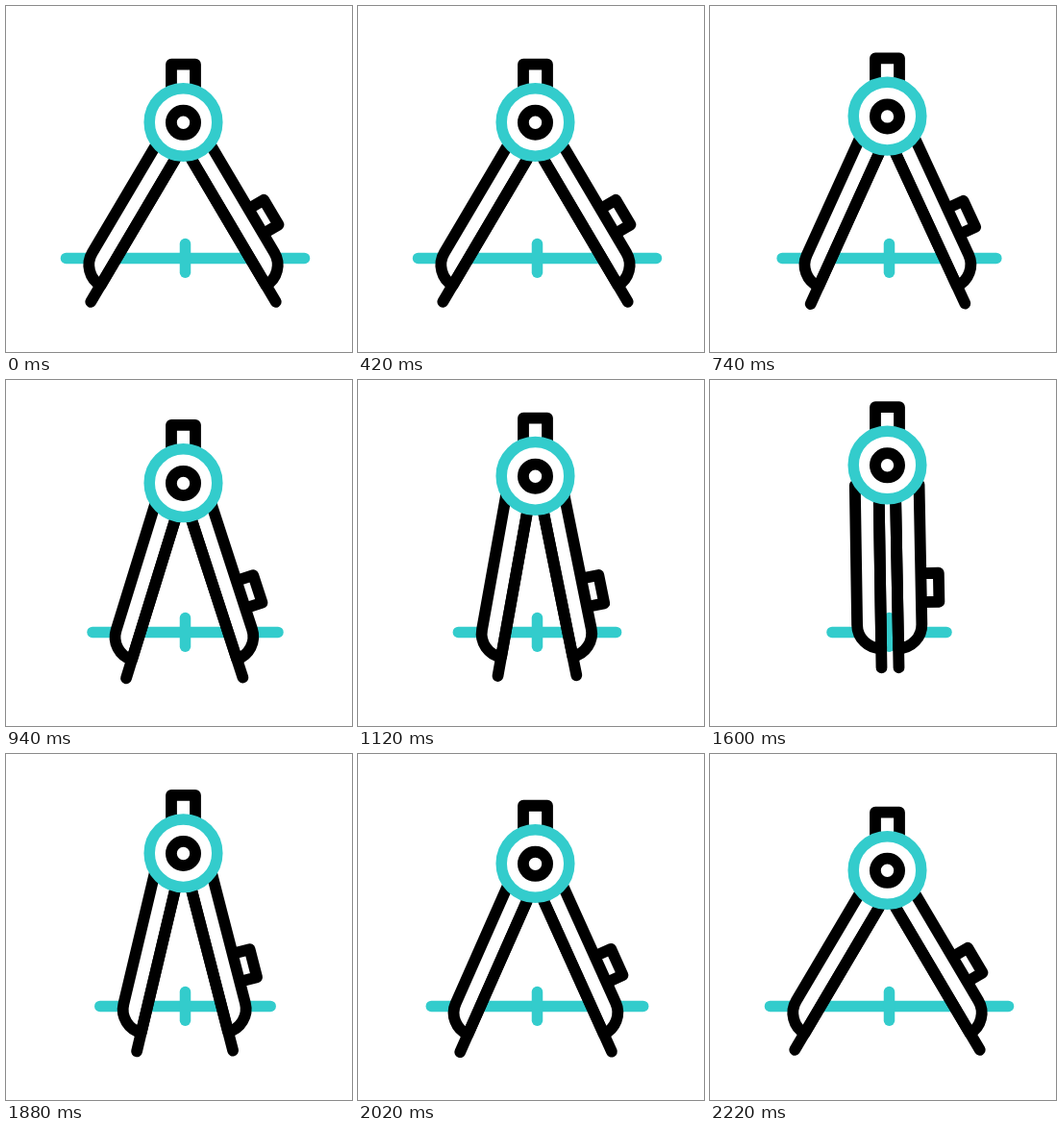
Recreate the animation shown at these times as an HTML page. Size 360 px wide and 360 px high, loop 2400 ms.

```html
<!DOCTYPE html>
<html lang="en">
<head>
<meta charset="utf-8">
<title>Drawing compass</title>
<style>
  html, body { margin: 0; width: 100%; height: 100%; overflow: hidden; background: #fff; }
  svg { display: block; width: 100vw; height: 100vh; }
  path, circle { stroke-linecap: round; stroke-linejoin: round; }
  .ink { stroke: #000; stroke-width: 11.8; fill: #fff; }
  .teal { stroke: #33cccc; stroke-width: 11.5; fill: #fff; }
</style>
</head>
<body>
<svg viewBox="0 0 360 360">
  <path id="base" class="teal"/>
  <path class="teal" d="M186.5 247.5V277.3"/>
  <g id="compass">
    <path class="ink" d="M172 -36V-60.3H197V-36"/>
    <g id="left" class="ink">
      <path d="M0 0V152A24.7 24.7 0 0 1 -24.7 127.3V-18"/>
      <path d="M0 0V172"/>
    </g>
    <g id="right" class="ink">
      <path d="M24.7 74.3H43.2V104.3H24.7"/>
      <path d="M0 0V152A24.7 24.7 0 0 0 24.7 127.3V-18"/>
      <path d="M0 0V172"/>
    </g>
    <circle class="teal" cx="184.5" r="35.3"/>
    <circle class="ink" cx="184.5" cy="0.3" r="12.6"/>
  </g>
</svg>
<script>
  const LOOP = 2400, START = 400, SHUT = 1600, END = 2200;
  const [base, compass, left, right] =
    ['base', 'compass', 'left', 'right'].map(id => document.getElementById(id));

  const clamp = u => Math.min(1, Math.max(0, u));
  const smooth = u => u * u * (3 - 2 * u);
  const mix = (a, b, k) => a + (b - a) * k;

  // 0 = legs spread, 1 = legs together
  const closing = t => t < SHUT
    ? smooth(clamp((t - START) / (SHUT - START)))
    : 1 - smooth(clamp((t - SHUT) / (END - SHUT)));

  // Each leg swings about the top of its inner edge.
  const swing = (leg, x, angle) =>
    leg.setAttribute('transform', `translate(${x} 38.8) rotate(${angle})`);

  function draw(now) {
    const k = closing(now % LOOP);
    const half = mix(124, 59.5, k);
    base.setAttribute('d', `M${186.5 - half} 262.4H${186.5 + half}`);
    compass.setAttribute('transform', `translate(0 ${mix(121, 88.5, k)})`);
    swing(left, 175.8, mix(30.6, -0.9, k));
    swing(right, 193.2, mix(-30.6, -1.1, k));
  }

  function tick() {
    draw(performance.now());
    requestAnimationFrame(tick);
  }
  tick();
</script>
</body>
</html>
```
